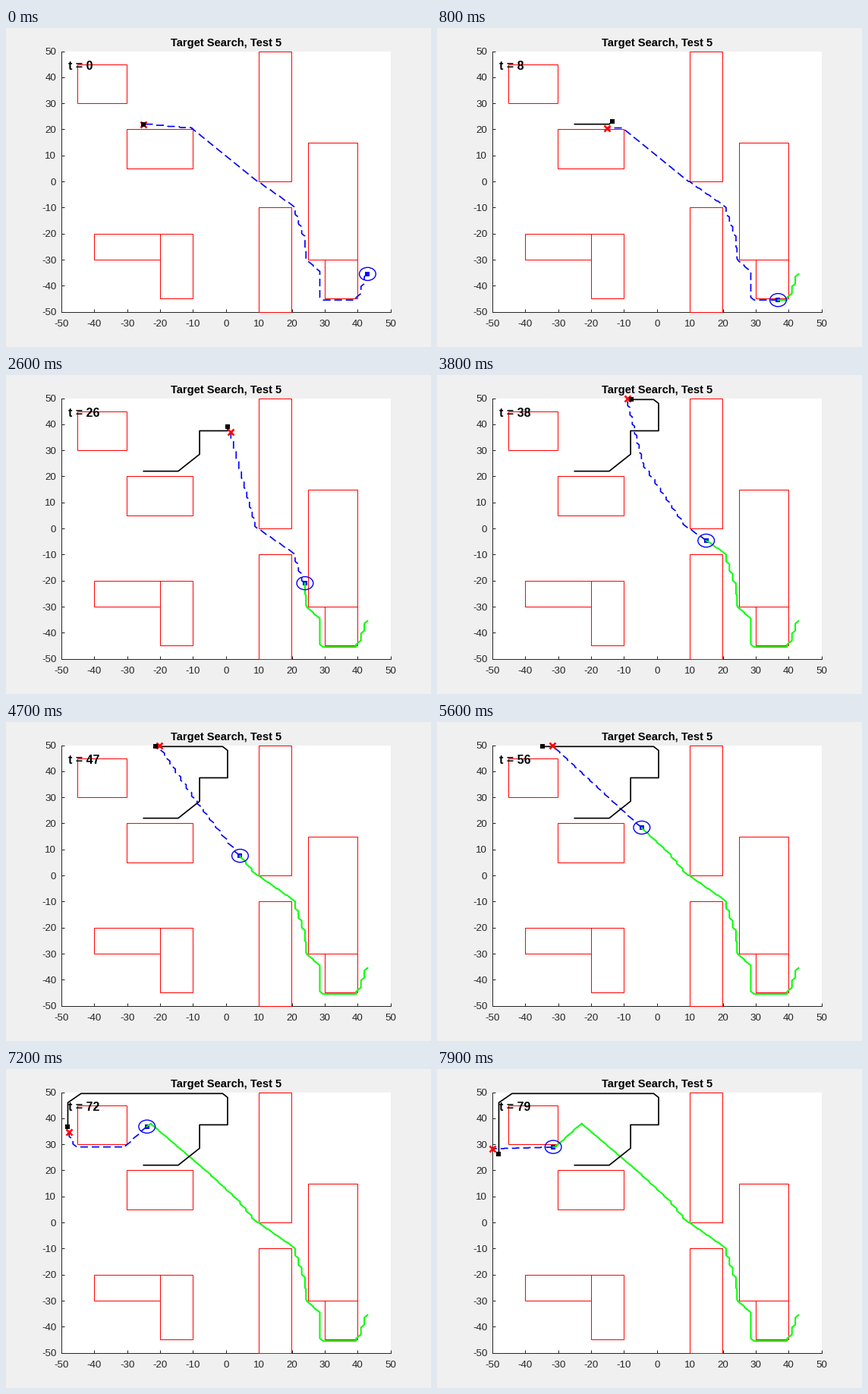
Animation of 560 by 420 pixels, one loop 8 s. Source, as a matplotlib script:

```python
import numpy as np
import matplotlib.pyplot as plt
from matplotlib.animation import FuncAnimation
from matplotlib.patches import Circle, Rectangle
from matplotlib.transforms import ScaledTranslation

FRAMES = 80
PX = 0.72  # points per pixel at 100 dpi
INK = "#262626"

plt.rcParams.update({
    "font.family": "Liberation Sans",
    "axes.unicode_minus": False,
    "toolbar": "None",
})

# x, y, width, height
WALLS = [
    (-45, 30, 15, 15), (-30, 5, 20, 15), (10, 0, 10, 50), (10, -50, 10, 40),
    (25, -30, 15, 45), (30, -45, 10, 15), (-40, -30, 20, 10), (-20, -45, 10, 25),
]

# The evader runs along these bends at constant speed
BENDS = np.array([
    (-25, 22), (-14.5, 22), (-8, 28.5), (-8, 37.5), (0.5, 37.5), (0.5, 48),
    (-1, 49.5), (-44, 49.5), (-48, 46), (-48, 20),
])
EVADER_SPEED = 1.492

# How far the estimate is off: time, dx, dy
ERROR = np.array([
    (0, 0, 0), (17, -3.4, -5.2), (26, 1, -2), (38, -1, 0.5), (56, 3, 0.5),
    (72, 0.4, -2), (79, -2, 2.1),
])

# Turning points of the pursuer: time, x, y
CORNER = (42.4, 9.6, 0)
TURNS = [
    (0, 43, -35.5), (4.6, 41, -43), (6.4, 39.5, -45.5), (12.3, 29.5, -45.5),
    (13.4, 28.5, -43.5), (18, 28.5, -34.5), (21.2, 24.6, -30), (26, 24, -21),
    (33, 21, -10), CORNER, (47.2, 4.3, 8), (56, -4.6, 18.4),
    (71, -22.8, 38), (78.2, -30.5, 29.2), (79, -31.5, 29),
]

# Wall corners the plan has to clear, above at first, below after the switch
SWITCH = 72
OVER = [(-10.2, 20.3), (-30.3, 46), (-45.5, 46)]
UNDER = [(-30.5, 29), (-45.3, 29)]


def arc(p):
    return np.r_[0, np.cumsum(np.hypot(*np.diff(p, axis=0).T))]


def along(p, s):
    """Points at distances s along the polyline p."""
    u = arc(p)
    return np.stack([np.interp(s, u, p[:, k]) for k in (0, 1)], axis=-1)


def stairs(a, b, size=3.7):
    """Grid-like way from a to b: a diagonal, then a straight run, repeated."""
    a, b = np.asarray(a, float), np.asarray(b, float)
    n = max(1, round(np.hypot(*(b - a)) / size))
    step = (b - a) / n
    diagonal = np.sign(step) * np.abs(step).min()
    points = [a]
    for k in range(n):
        points += [a + k * step + diagonal, a + (k + 1) * step]
    return np.array(points)


def chain(points):
    return np.vstack([stairs(a, b) for a, b in zip(points, points[1:])])


def build_route(n=40):
    times, points = [], []
    for (t0, *a), (t1, *b) in zip(TURNS, TURNS[1:]):
        leg = stairs(a, b)
        times.append(np.linspace(t0, t1, n))
        points.append(along(leg, np.linspace(0, arc(leg)[-1], n)))
    return np.concatenate(times), np.vstack(points)


TIME, ROUTE = build_route()


def evader_path(t):
    s = EVADER_SPEED * t
    return np.vstack([BENDS[arc(BENDS) <= s], along(BENDS, s)])


def estimate(t, prey):
    off = [np.interp(t, ERROR[:, 0], ERROR[:, k]) for k in (1, 2)]
    return np.clip(prey + off, -50, 50)


def plan(t, pos, goal):
    ahead = t < CORNER[0]
    way = [np.array(CORNER[1:]) if ahead else pos]
    side, posts = (1, OVER) if t < SWITCH else (-1, UNDER)
    for x, y in posts:
        (x0, y0), (x1, y1) = way[-1], goal
        if x1 < x < x0:
            level = y0 + (y1 - y0) * (x - x0) / (x1 - x0)
            if side * (y - level) > 0:
                way.append(np.array((x, y)))
    if len(way) == 1 and t < SWITCH:
        bow = 4.5 * np.exp(-((t - 39) / 6) ** 2)
        way.append((way[0] + goal) / 2 - (bow, 0))
    head = chain([*way, goal])
    tail = ROUTE[(TIME > t) & (TIME < CORNER[0])]
    return np.vstack([pos, tail, head])


fig = plt.figure(figsize=(5.6, 4.2), dpi=100, facecolor="#f0f0f0")
ax = fig.add_axes([72.8 / 560, 46.4 / 420, 434 / 560, 343 / 420])
ax.set(xlim=(-50, 50), ylim=(-50, 50),
       xticks=range(-50, 51, 10), yticks=range(-50, 51, 10))
ax.spines[["top", "right"]].set_visible(False)
for side in ("left", "bottom"):
    ax.spines[side].set(color=INK, linewidth=PX)
ax.tick_params(direction="in", length=4 * PX, width=PX, color=INK,
               labelcolor=INK, labelsize=13.33 * PX)
ax.tick_params(axis="x", pad=10 * PX)
ax.tick_params(axis="y", pad=6.5 * PX)


def label(x, y, text, size, ha):
    return fig.text(x / 560, 1 - y / 420, text, fontsize=size * PX, ha=ha,
                    va="baseline", weight="bold", color="black")


label(290.2, 24, "Target Search, Test 5", 14.67, "center")
clock = label(82, 55, "", 16, "left")

# Half a pixel left, so that edges snap down to whole pixels
snap = ax.transData + ScaledTranslation(-0.0045, 0, fig.dpi_scale_trans)
for x, y, w, h in WALLS:
    ax.add_patch(Rectangle((x, y), w, h, fill=False, ec="red", lw=PX,
                           zorder=3, clip_on=False, transform=snap))


def line(color, width, z, **kw):
    return ax.plot([], [], color=color, lw=width * PX, zorder=z,
                   clip_on=False, **kw)[0]


def marker(shape, color, size, z, edge=0):
    return ax.plot([], [], shape, color=color, ms=size * PX,
                   mew=edge * PX, zorder=z, clip_on=False)[0]


way = line("blue", 1.7, 4, dashes=(10 / 1.7, 5 / 1.7), dash_capstyle="butt")
hunter = marker("s", "blue", 6.4, 5)
trail = line("lime", 2, 6, solid_joinstyle="round")
flight = line("black", 1.7, 7, solid_joinstyle="round")
guess = marker("x", "red", 8, 8, 2.6)
runner = marker("s", "black", 6.4, 9)
ring = ax.add_patch(Circle((0, 0), 2.5, fill=False, ec="blue", lw=1.4 * PX,
                           zorder=7, clip_on=False))


def draw(t):
    pos = np.array([np.interp(t, TIME, ROUTE[:, k]) for k in (0, 1)])
    path = evader_path(t)
    prey = path[-1]
    goal = estimate(t, prey)
    clock.set_text(f"t = {t}")
    way.set_data(*plan(t, pos, goal).T)
    trail.set_data(*np.vstack([ROUTE[TIME <= t], pos]).T)
    flight.set_data(*path.T)
    for mark, p in ((hunter, pos), (runner, prey), (guess, goal)):
        mark.set_data([p[0]], [p[1]])
    ring.set_center(pos)
    return clock, way, trail, flight, hunter, runner, guess, ring


anim = FuncAnimation(fig, draw, frames=FRAMES, interval=100, repeat=True,
                     repeat_delay=0, blit=False)
plt.show()
```
